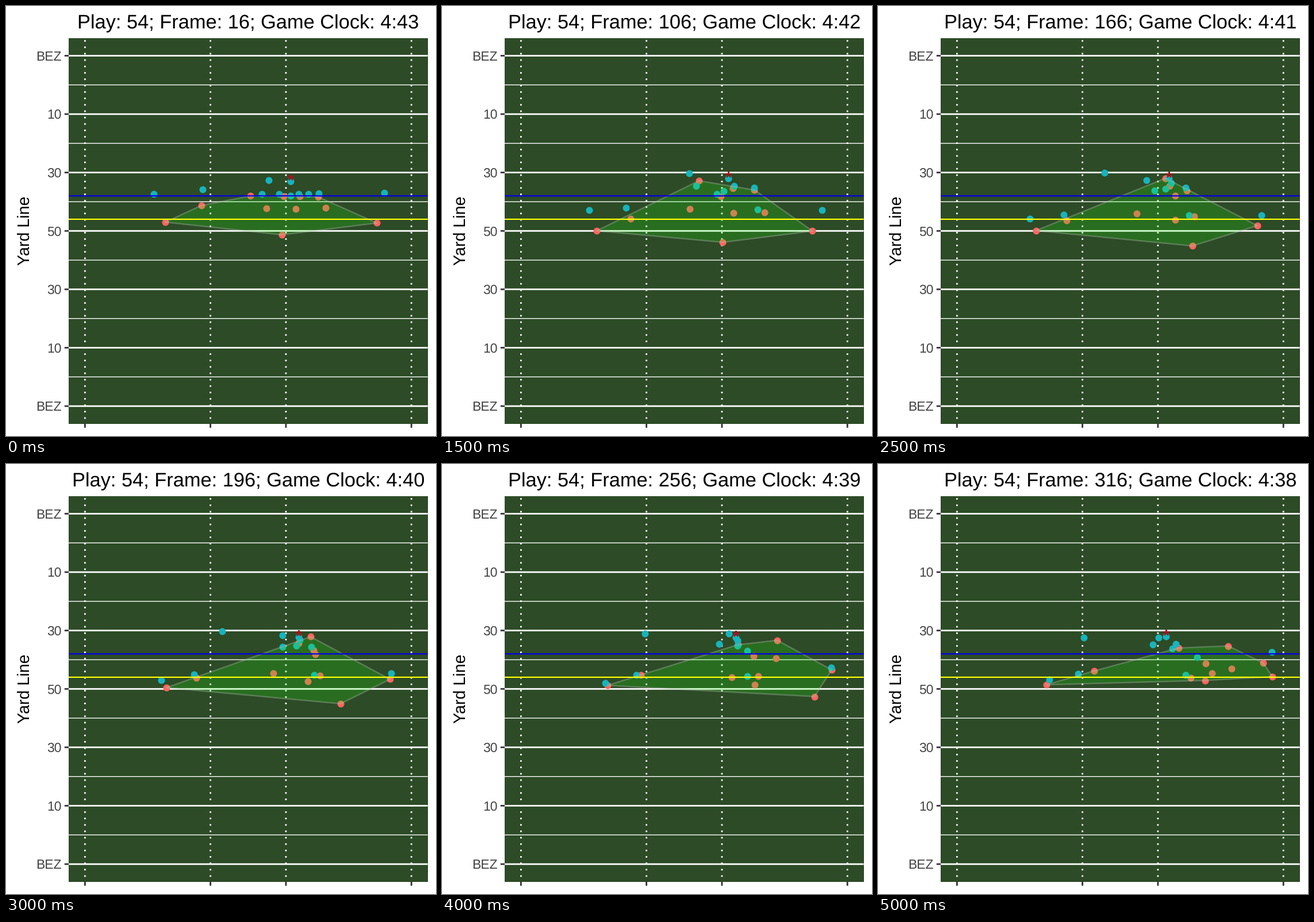
Recreate the animation shown at these times as a matplotlib script. Size 748x748 px, loop 5.5 s.

```python
import numpy as np
import matplotlib.pyplot as plt
from matplotlib.animation import FuncAnimation
from matplotlib.patches import Polygon, Rectangle

plt.rcParams["text.hinting"] = "none"

SIZE, DPI = 748, 100
PT = 72 / DPI                       # points per pixel
STEPS, STEP_MS = 11, 500
KEYS = (0, 3, 6, 10)

LEFT, RIGHT, TOP, BOTTOM = 109, 733.6, 56, 726.5
YARD_X = (RIGHT - LEFT) / (160 / 3 * 1.1)
YARD_Y = (BOTTOM - TOP) / 132
FONT = "Liberation Sans"
TURF, RED, TEAL = "#2c4b26", "#fc6560", "#18b4bc"


def run(*points):
    """Cubic path of a player through four key positions."""
    curve = np.polyfit(KEYS, points, 3)
    return np.vander(range(STEPS), 4) @ curve


def hull(points):
    """Convex hull by the monotone chain."""
    pts = sorted(map(tuple, points))

    def chain(seq):
        out = []
        for x, y in seq:
            while len(out) > 1:
                (x0, y0), (x1, y1) = out[-2:]
                if (x1 - x0) * (y - y0) - (y1 - y0) * (x - x0) > 0:
                    break
                out.pop()
            out.append((x, y))
        return out[:-1]

    return chain(pts) + chain(pts[::-1])


# Defence
secondary = [
    run((277, 376), (269, 391), (279, 389), (293, 384)),
    run((340, 347), (328.5, 370), (331, 372), (376, 360)),
    run((480, 398), (488.5, 411), (582, 417), (686, 370)),
    run((645, 377.5), (644.5, 391.5), (668, 374.5), (670, 346)),
]
front = [
    run((425, 330.5), (447, 304), (530, 300.5), (609, 316.5)),
    run((483, 331), (485, 331), (538, 331), (615.5, 356.5)),
    run((511, 331.5), (506, 317), (509, 312.5), (523, 320)),
    run((543, 332), (543.5, 320), (535, 324), (570.5, 347.5)),
]
linebackers = [
    run((453.5, 352), (431, 353.5), (465.5, 364.5), (544, 371.5)),
    run((504, 353.5), (507, 360), (525, 378), (569, 376.5)),
    run((556.5, 351), (561, 359.5), (546, 368), (581.5, 364)),
]
# Offence
receivers = [
    run((257, 327), (256, 355), (270, 376), (298.5, 375)),
    run((342, 319.5), (320, 351.5), (327, 365.5), (347.5, 365)),
    run((544.5, 326), (549, 354.5), (536.5, 367), (535, 366.5)),
    run((658.5, 325), (661.5, 355), (670, 364), (685.5, 327)),
]
line = [
    run((445, 327), (442.5, 313), (481, 298.5), (488.5, 302)),
    run((475, 327.5), (478, 327), (481.5, 318), (478, 314)),
    run((495, 330.5), (490, 322.5), (505.5, 316), (512, 321.5)),
    run((509, 327), (508, 313.5), (511, 306), (517.5, 313)),
    run((526, 327.5), (543, 316.5), (531, 318), (555.5, 336)),
]
runner = run((457, 303), (430, 291), (376, 291), (358.5, 302))
passer = run((495.5, 305), (498, 300), (509, 301), (501.5, 300))
ball = passer - (0, 7)

defence = np.array(secondary + front + linebackers)
offence = np.array(receivers + line + [runner, passer])

fig = plt.figure(figsize=(SIZE / DPI, SIZE / DPI), dpi=DPI, facecolor="white")
ax = fig.add_axes([0, 0, 1, 1])
ax.set_xlim(0, SIZE)
ax.set_ylim(SIZE, 0)
ax.axis("off")
ax.add_patch(Rectangle((LEFT, TOP), RIGHT - LEFT, BOTTOM - TOP, fc=TURF, lw=0, zorder=0))


def stroke(xs, ys, color, width=2.78, z=1, style="-"):
    ax.plot(xs, ys, color=color, lw=width * PT, ls=style, zorder=z,
            solid_capstyle="butt", dash_capstyle="butt", snap=False)


def label(x, y, text, px, color="black", **kw):
    return ax.text(x, y, text, fontsize=px * PT, color=color, family=FONT,
                   va="baseline", **kw)


def yard_y(yards):
    return TOP + (yards + 6) * YARD_Y


for yards in range(10, 120, 20):
    stroke([LEFT, RIGHT], [yard_y(yards)] * 2, "white", 1.39)
for yards in range(0, 121, 20):
    y = yard_y(yards)
    stroke([LEFT, RIGHT], [y, y], "white")
    stroke([LEFT - 7.2, LEFT], [y, y], "#333333")
    name = str(50 - abs(yards - 60)) if 0 < yards < 120 else "BEZ"
    label(96.2, y + 8.2, name, 22.9, "#444444", ha="right")
for yards in (0, 20.5, 160 / 3 - 20.5, 160 / 3):
    x = LEFT + (yards + 8 / 3) * YARD_X
    stroke([x, x], [BOTTOM, TOP], "white", style=(1, (1, 3)))
    stroke([x, x], [BOTTOM, BOTTOM + 7.2], "#333333")

stroke([LEFT, RIGHT], [yard_y(48)] * 2, "#0500e8", 2.22, z=6)
stroke([LEFT, RIGHT], [yard_y(56)] * 2, "#ffff00", 2.22, z=6)
label(41, yard_y(60), "Yard Line", 28.6, ha="center", rotation=90, rotation_mode="anchor")
title = label((LEFT + RIGHT) / 2, 39, "", 34.375, ha="center")


def dots(color, z):
    return ax.plot([], [], "o", color=color, ms=12 * PT, mew=0, zorder=z, snap=False)[0]


red_dots, teal_dots = dots(RED, 3), dots(TEAL, 4)
area = ax.add_patch(Polygon([(0, 0), (1, 0), (0, 1)], fc=(0.12, 0.98, 0.05, 0.2),
                            ec=(0.75, 0.75, 0.75, 0.33), lw=2.5 * PT,
                            joinstyle="round", zorder=5))
star, = ax.plot([], [], marker=(5, 2, 0), ls="none", color="#a01420",
                ms=11 * PT, mew=2 * PT, zorder=7, snap=False)


def draw(step):
    red_dots.set_data(*defence[:, step].T)
    teal_dots.set_data(*offence[:, step].T)
    area.set_xy(hull(defence[:, step]))
    star.set_data(*ball[step].reshape(2, 1))
    title.set_text(f"Play: 54; Frame: {16 + 30 * step}; Game Clock: 4:{43 - step // 2}")
    return red_dots, teal_dots, area, star, title


anim = FuncAnimation(fig, draw, frames=STEPS, interval=STEP_MS, repeat=True, repeat_delay=0)
plt.show()
```
